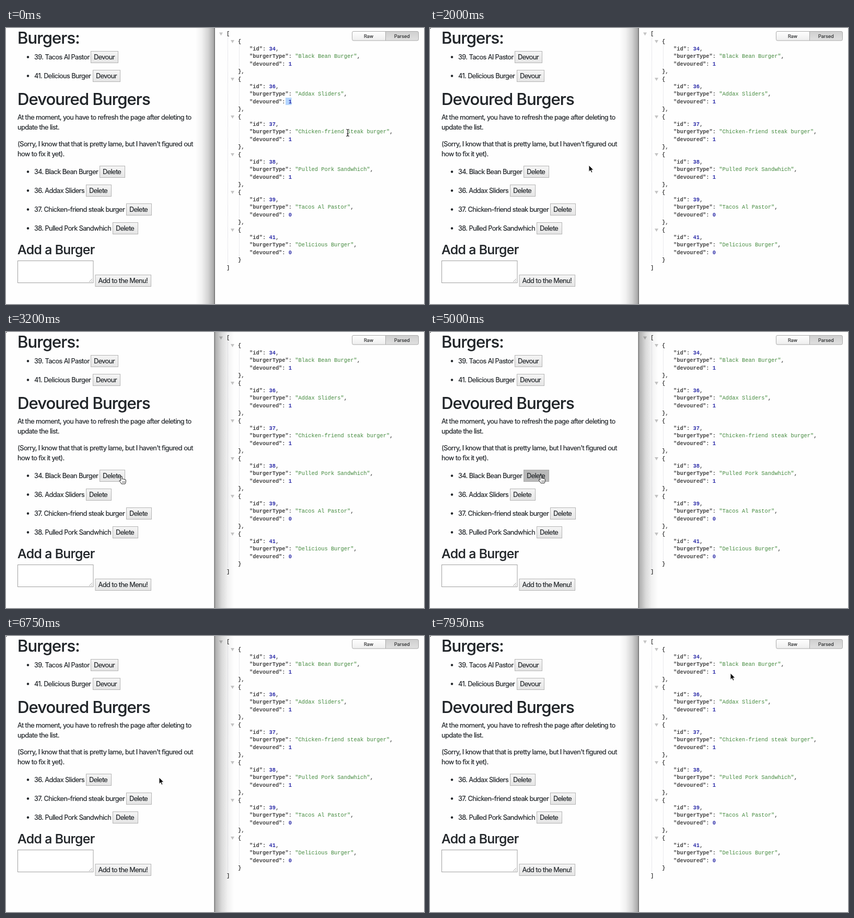
Animation, 800 px wide and 527 px high, one loop 8 s. Source, as an HTML page:

```html
<!DOCTYPE html>
<html lang="en">
<head>
<meta charset="utf-8">
<title>Burger list</title>
<style>
  html, body { margin: 0; width: 100%; height: 100%; overflow: hidden; background: #fefefe; }
  svg { display: block; width: 800px; height: 527px; }
  text {
    white-space: pre; fill: #212529; stroke: #212529; stroke-width: .2;
    font: 12.8px Inter, sans-serif; letter-spacing: -.046em;
  }
  .h1 { font-size: 31px; font-weight: 500; letter-spacing: -.029em; }
  .h2 { font-size: 24.8px; font-weight: 500; letter-spacing: -.025em; }
  .json { font: bold 10.4px "Liberation Mono", monospace; letter-spacing: 0; fill: #444; stroke: none; }
  .string { font-weight: normal; fill: #448a3e; }
  .number { fill: #2c2ca8; }
  .tab { font-size: 9px; letter-spacing: 0; fill: #333; }
  .button { fill: url(#buttonFill); stroke: #b4b4b4; }
  .button.pressed { fill: #b9b9b9; stroke: #a8a8a8; }
</style>
</head>
<body>
<svg id="stage" viewBox="0 0 800 527"></svg>
<script>
const LOOP = 8000;
const ROW = 36;
const LINE = 14.4;
const DELETED_AT = 6300;

// id, name, devoured, x of the button
const burgers = [
  [34, 'Black Bean Burger', 1, 179],
  [36, 'Addax Sliders', 1, 153],
  [37, 'Chicken-friend steak burger', 1, 230],
  [38, 'Pulled Pork Sandwhich', 1, 204],
  [39, 'Tacos Al Pastor', 0, 162],
  [41, 'Delicious Burger', 0, 166]
];

const text = (x, y, content, cls = '') => `<text x="${x}" y="${y}" class="${cls}">${content}</text>`;

const button = (x, y, width, label, id = '') =>
  `<rect id="${id}" class="button" x="${x + .5}" y="${y - 10.5}" width="${width - 1}" height="22"/>` +
  text(x + 6, y + 4.5, label);

function listItem([id, name, devoured, buttonX], y) {
  const control = devoured
    ? button(buttonX, y, 49, 'Delete', 'delete' + id)
    : button(buttonX, y, 53, 'Devour');
  return `<circle cx="42" cy="${y + .5}" r="2.2" fill="#212529"/>` + text(54, y + 4.5, `${id}. ${name}`) + control;
}

function page() {
  const [first, ...rest] = burgers.filter(b => b[2]);
  return text(22, 30, 'Burgers:', 'h1') +
    burgers.filter(b => !b[2]).map((b, i) => listItem(b, 55 + i * ROW)).join('') +
    text(22, 147, 'Devoured Burgers', 'h1') +
    text(22, 174.5, 'At the moment, you have to refresh the page after deleting to') +
    text(22, 193.7, 'update the list.') +
    text(22, 226, "(Sorry, I know that that is pretty lame, but I haven't figured out") +
    text(22, 245.2, 'how to fix it yet).') +
    `<g id="firstItem">${listItem(first, 274)}</g><g id="below">` +
    rest.map((b, i) => listItem(b, 310 + i * ROW)).join('') +
    text(22, 431.5, 'Add a Burger', 'h2') +
    '<rect x="22.5" y="444.5" width="144.5" height="42" fill="#fff" stroke="#a0a0a0"/>' +
    '<path d="M159 485l6-6M162.5 485l2.5-2.5" stroke="#888" stroke-width=".8"/>' +
    button(170.5, 482, 107.5, 'Add to the Menu!') + '</g>';
}

const lineY = n => 11 + n * LINE;
const jsonLine = (depth, n, content) => text(422 + depth * 22, lineY(n) + 3.2, content, 'json');
const fold = (depth, n) =>
  `<path d="M${408 + depth * 22} ${lineY(n) - 2.5}h7l-3.5 6z" fill="#c4c4c4"/>`;
const guide = (depth, from, to) =>
  `<path d="M${424.5 + depth * 22} ${lineY(from) + 7}V${lineY(to) - 7}" stroke="#d4d4dc" stroke-dasharray="1 1"/>`;
const span = (cls, content) => `<tspan class="${cls}">${content}</tspan>`;

function json() {
  let out = jsonLine(0, 0, '[') + jsonLine(0, 31, ']') + fold(0, 0) + guide(0, 0, 31);
  burgers.forEach(([id, name, devoured], i) => {
    const n = 1 + i * 5;
    out += fold(1, n) + guide(1, n, n + 4) +
      jsonLine(1, n, '{') +
      jsonLine(2, n + 1, `"id": ${span('number', id)},`) +
      jsonLine(2, n + 2, `"burgerType": ${span('string', `"${name}"`)},`) +
      jsonLine(2, n + 3, `"devoured": ${span('number', devoured)}`) +
      jsonLine(1, n + 4, i < 5 ? '},' : '}');
  });
  return out;
}

const tabs = `
  <rect x="662.5" y="6.5" width="127" height="17.5" rx="2.5" fill="url(#tabFill)"/>
  <path d="M726.5 6.5h60.5q2.5 0 2.5 2.5v12.5q0 2.5-2.5 2.5h-60.5z" fill="url(#activeTabFill)"/>
  <rect x="662.5" y="6.5" width="127" height="17.5" rx="2.5" fill="none" stroke="#aaa"/>
  <path d="M726.5 6.5v17.5" stroke="#aaa"/>` +
  text(685, 18.5, 'Raw', 'tab') + text(743, 18.5, 'Parsed', 'tab');

const gradient = (id, direction, ...colors) =>
  `<linearGradient id="${id}" x2="${direction === 'across' ? 1 : 0}" y2="${direction === 'across' ? 0 : 1}">` +
  colors.map((c, i) => `<stop offset="${i / (colors.length - 1)}" stop-color="${c}"/>`).join('') +
  '</linearGradient>';

const beamShape = 'M-2.5-6.5Q0-6.5 0-4.5V4.5Q0 6.5-2.5 6.5M2.5-6.5Q0-6.5 0-4.5V4.5Q0 6.5 2.5 6.5M-1.5 2h3';
const cursors = `
  <path id="arrow" d="M0 0V12.5L2.9 9.8 4.9 14.3 7 13.4 5.1 9H9z" fill="#111" stroke="#fff" stroke-width=".9"/>
  <g id="beam" fill="none" stroke-linecap="round">
    <path d="${beamShape}" stroke="#fff" stroke-width="2.6"/>
    <path d="${beamShape}" stroke="#222" stroke-width="1.2"/>
  </g>
  <g id="hand" stroke="#222" stroke-linejoin="round">
    <path d="M-1.3 8V1Q-1.3-.5 0-.5T1.3 1V5Q2.3 4 3.6 5.2 5 4.3 6 5.7 8 5 8.3 7V10.5Q8 12 7 14H0Q-1.5 11-3.8 8.6-4.3 6.8-2.6 7z" fill="#fff"/>
    <path d="M2 9v3M4 9v3M6 9v3" stroke-width=".7"/>
  </g>`;

document.getElementById('stage').innerHTML = `
  <defs>
    ${gradient('buttonFill', 'down', '#f5f5f5', '#e5e5e5')}
    ${gradient('tabFill', 'down', '#fff', '#eee')}
    ${gradient('activeTabFill', 'down', '#cfcfcf', '#e0e0e0')}
    ${gradient('leftShadow', 'across', '#0000', '#0000000c', '#0000002a', '#0000005c')}
    ${gradient('rightShadow', 'across', '#00000054', '#00000026', '#0000000c', '#0000')}
  </defs>
  <rect width="800" height="527" fill="#fefefe"/>
  ${page()}
  <rect id="selection" x="535" y="133" width="11.5" height="14" fill="#b4d5fe"/>
  ${json()}${tabs}
  <rect id="shadowOnLeft" x="362" width="37" height="527" fill="url(#leftShadow)"/>
  <rect id="shadowOnRight" x="400" width="37" height="527" fill="url(#rightShadow)"/>
  <rect x="398.4" width="1.6" height="527" fill="#747474"/>
  <rect id="corner" width="1.5" height="1" fill="#000"/>
  <g id="pointer">${cursors}</g>`;

// Pointer stops: time, x, y
const path = [
  [0, 654, 200], [120, 654, 200], [800, 562, 53], [1100, 562, 53],
  [1850, 304, 262], [2250, 304, 262], [2950, 221, 276], [3600, 221, 276],
  [4300, 212, 274.5], [5500, 212, 274.5], [6100, 293, 270],
  [7250, 293, 270], [7900, 575, 71], [LOOP, 575, 71]
];

function pointerAt(t) {
  const i = path.findIndex(stop => stop[0] > t);
  const [t0, x0, y0] = path[i - 1], [t1, x1, y1] = path[i];
  const p = (t - t0) / (t1 - t0);
  const eased = p * p * (3 - 2 * p);
  return [x0 + (x1 - x0) * eased, y0 + (y1 - y0) * eased];
}

const el = id => document.getElementById(id);
const show = (id, visible) => el(id).setAttribute('visibility', visible ? 'visible' : 'hidden');

function draw(t) {
  const [x, y] = pointerAt(t);
  const deleted = t >= DELETED_AT;
  const overDelete = !deleted && x > 179 && x < 228 && y > 263 && y < 286;
  const shape = overDelete ? 'hand' : t < 2000 && x > 440 ? 'beam' : 'arrow';
  const leftActive = t >= 3000 && t < 7800;

  el('pointer').setAttribute('transform', `translate(${x} ${y})`);
  for (const id of ['arrow', 'beam', 'hand']) show(id, id === shape);
  show('selection', t < 450);
  show('corner', t >= 40);
  show('shadowOnLeft', !leftActive);
  show('shadowOnRight', leftActive);
  show('firstItem', !deleted);
  el('below').setAttribute('transform', `translate(0 ${deleted ? -ROW : 0})`);
  el('delete34').classList.toggle('pressed', t >= 4930 && t < 5130);
}

function tick() {
  draw(performance.now() % LOOP);
  requestAnimationFrame(tick);
}
tick();
</script>
</body>
</html>
```
